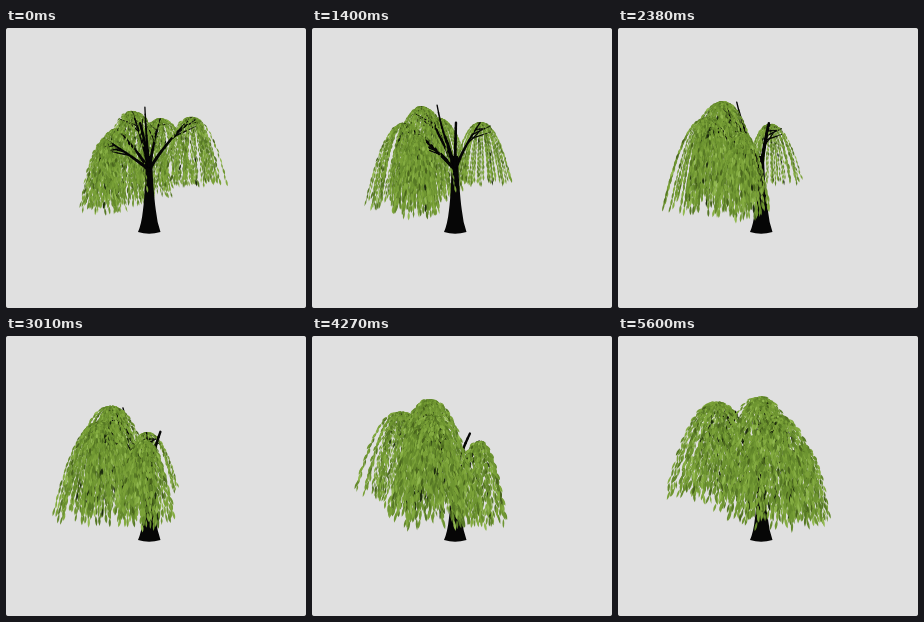
An HTML page with a canvas that plays this animation: 300 by 280 pixels, repeating every 5.67 s.

```html
<!DOCTYPE html>
<html>
<head>
<meta charset="utf-8">
<title>Willow</title>
<style>
html, body { margin: 0; width: 100%; height: 100%; overflow: hidden; background: #333; }
canvas { display: block; width: 300px; height: 280px; border-radius: 3px; background: #e0e0e0; }
</style>
</head>
<body>
<canvas id="stage" width="300" height="280"></canvas>
<script>
const ctx = document.getElementById('stage').getContext('2d');
const STEP = 70, STEPS = 81, TURN = 1.875 * Math.PI / 180;
const CX = 143, HORIZON = 150, DIST = 250;
const GREENS = ['#48641d', '#567825', '#64892c', '#6f9632', '#7aa138', '#84ac41', '#92b950'];

let seed = 11;
const rnd = () => {
  seed = (seed * 1664525 + 1013904223) >>> 0;
  return seed / 4294967296;
};
const spread = n => (rnd() - 0.5) * 2 * n;

// angle: degrees from the back, growing towards the left; y: height above the horizon
const polar = (angle, r, y) => {
  const a = angle * Math.PI / 180;
  return { x: -r * Math.sin(a), y, z: -r * Math.cos(a) };
};
const mix = (p, q, t) => ({
  x: p.x + (q.x - p.x) * t, y: p.y + (q.y - p.y) * t, z: p.z + (q.z - p.z) * t
});
const parts = [];

function addLimb(from, bend, to, w0, w1, n = 8) {
  const at = t => mix(mix(from, bend, t), mix(bend, to, t), t);
  for (let i = 0; i < n; i++) {
    parts.push({ p: at(i / n), q: at((i + 1) / n), w: w0 + (w1 - w0) * i / n, color: '#050505' });
  }
  return at;
}

function addStrand(top, w, len, turn) {
  const dir = turn * 2 * Math.PI, k = 0.1 + 0.9 * Math.sqrt(rnd());
  const drop = len * (1 - 0.09 * k) * (0.86 + 0.14 * rnd());
  const n = Math.round(drop / 4.4);
  const at = t => {
    const u = t ** 1.4, out = w * k * u ** 0.45;
    return { x: top.x + out * Math.cos(dir), y: top.y - drop * u, z: top.z + out * Math.sin(dir) };
  };
  for (let i = 0; i < n; i++) {
    const p = at(i / n), q = at((i + 1.2) / n);
    const side = i % 2 ? 0.8 : -0.8;
    q.x += side + spread(0.6);
    q.z += -side + spread(0.6);
    const dark = k < 0.6 && rnd() < 0.06;
    const color = dark ? '#1c2b0e' : GREENS[Math.floor(rnd() * 4 + rnd() * 3)];
    parts.push({ p, q, w: 1.4 + rnd() * 0.7, color, leaf: true });
  }
}

// angle, radius, height, strand spread, strand length, strand count
const crowns = [
  [-77, 45, 63, 39, 78, 46],
  [30, 38, 75, 45, 107, 72],
  [-15, 52, 71, 44, 90, 60],
  [94, 43, 38, 25, 77, 46],
  [45, 52, 56, 41, 93, 60]
];
for (const [angle, r, h, w, len, count] of crowns) {
  const top = polar(angle, r, h);
  const limb = addLimb(polar(0, 0, 8), polar(angle, r * 0.3, h * 0.5), top, 3.4, 1.3);
  for (let i = 0; i < 4; i++) {
    const from = limb(0.55 + i * 0.1);
    const to = polar(angle + spread(22), r * (0.8 + 0.3 * rnd()), h - 5 - 9 * rnd());
    addLimb(from, mix(from, to, 0.5), to, 1.5, 0.7, 3);
  }
  for (let i = 0; i < count; i++) addStrand(top, w, len, i * 0.618);
}
// bare tips
addLimb(polar(0, 0, 12), polar(10, 18, 45), polar(10, 26, 78), 3, 1.2);
addLimb(polar(0, 0, 12), polar(146, 6, 34), polar(146, 15, 52), 3, 2.2);

function project(v, c, s) {
  const z = v.z * c - v.x * s, k = DIST / (DIST - z);
  return { x: CX + (v.x * c + v.z * s) * k, y: HORIZON - v.y * k, z, k };
}

function drawTrunk() {
  ctx.fillStyle = '#060606';
  ctx.beginPath();
  ctx.moveTo(140, 128);
  ctx.bezierCurveTo(139.5, 150, 138.5, 172, 137, 182);
  ctx.quadraticCurveTo(135.5, 196, 132, 204);
  ctx.quadraticCurveTo(143, 207.5, 154.5, 204);
  ctx.quadraticCurveTo(151, 194, 149.8, 182);
  ctx.bezierCurveTo(148, 168, 146.5, 148, 146, 128);
  ctx.fill();
}

function drawPart({ a, b, part }) {
  const w = part.w * a.k;
  if (!part.leaf) {
    ctx.strokeStyle = part.color;
    ctx.lineWidth = w;
    ctx.beginPath();
    ctx.moveTo(a.x, a.y);
    ctx.lineTo(b.x, b.y);
    ctx.stroke();
    return;
  }
  const dx = b.x - a.x, dy = b.y - a.y, len = Math.hypot(dx, dy) || 1;
  const nx = -dy / len * w, ny = dx / len * w;
  const mx = (a.x + b.x) / 2, my = (a.y + b.y) / 2;
  ctx.fillStyle = part.color;
  ctx.beginPath();
  ctx.moveTo(a.x, a.y);
  ctx.quadraticCurveTo(mx + nx, my + ny, b.x, b.y);
  ctx.quadraticCurveTo(mx - nx, my - ny, a.x, a.y);
  ctx.fill();
}

function draw(step) {
  const c = Math.cos(step * TURN), s = Math.sin(step * TURN);
  const items = parts.map(part => ({ part, a: project(part.p, c, s), b: project(part.q, c, s) }));
  items.sort((m, n) => m.a.z - n.a.z);
  ctx.fillStyle = '#e0e0e0';
  ctx.fillRect(0, 0, 300, 280);
  ctx.lineCap = 'round';
  let trunk = false;
  for (const item of items) {
    if (!trunk && item.a.z >= 0) {
      drawTrunk();
      trunk = true;
    }
    drawPart(item);
  }
}

let shown = -1;
const start = performance.now();
function tick() {
  const step = Math.floor(Math.max(0, performance.now() - start) / STEP) % STEPS;
  if (step !== shown) draw(shown = step);
  requestAnimationFrame(tick);
}
tick();
</script>
</body>
</html>
```
